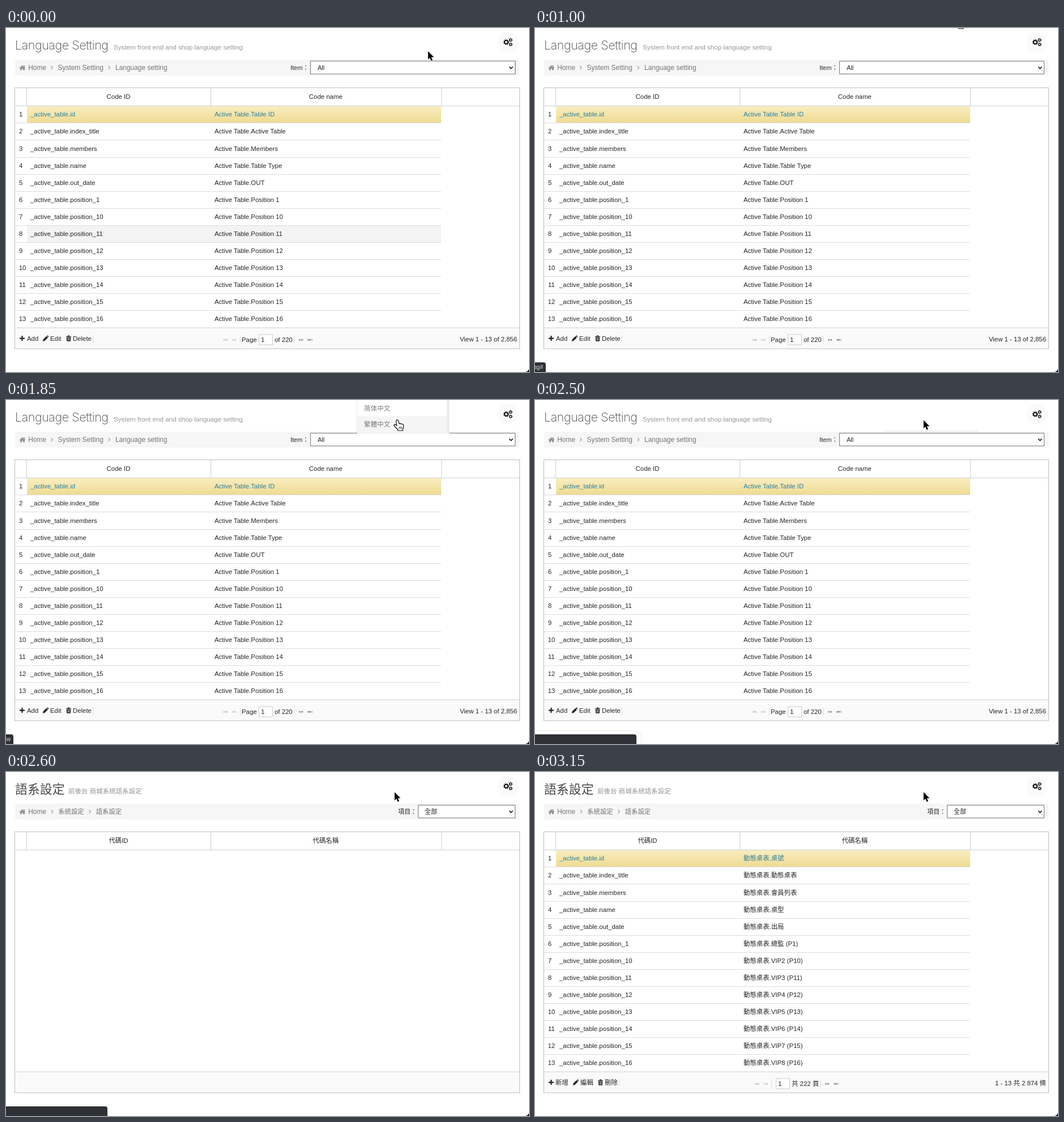
Recreate the animation shown at these times as an HTML page. Size 923 by 607 pixels, loop 3250 ms.

```html
<!DOCTYPE html>
<html lang="en">
<head>
<meta charset="utf-8">
<title>Language Setting</title>
<style>
html, body { margin: 0; width: 100%; height: 100%; overflow: hidden; background: #fff; }
svg { display: block; width: 100vw; height: 100vh; }
text { font-family: "Liberation Sans", "Noto Sans CJK TC", "Noto Sans CJK", sans-serif; font-size: 11.4px; fill: #252525; white-space: pre; }
.title { font-family: Inter, "Noto Sans CJK TC Light", "Noto Sans CJK TC", sans-serif; font-weight: 200; fill: #484848; }
.sub { fill: #969696; }
.crumb { fill: #757575; }
.link { fill: #2d7f9f; }
.menu { font-family: "Noto Sans CJK SC", "Noto Sans CJK TC", sans-serif; font-size: 11.5px; fill: #7a7a7a; }
</style>
</head>
<body>
<svg id="stage" viewBox="0 0 923 607" preserveAspectRatio="none"></svg>
<script>
const LOOP = 3250, STEP = 50;
const stage = document.getElementById('stage');

const text = (x, y, s, attrs = '') => `<text x="${x}" y="${y}" ${attrs}>${s}</text>`;
const rect = (x, y, w, h, fill, attrs = '') =>
  `<rect x="${x}" y="${y}" width="${w}" height="${h}" fill="${fill}" ${attrs}/>`;
const path = (d, attrs) => `<path d="${d}" ${attrs}/>`;
const line = (d, color, w = 1) => path(d, `fill="none" stroke="${color}" stroke-width="${w}"`);
const group = (id, body) => `<g id="${id}">${body}</g>`;
const shift = (x, y, body) => `<g transform="translate(${x} ${y})">${body}</g>`;

const MID = 'text-anchor="middle"', END = 'text-anchor="end"';
const ROW_H = 30.07, ROW_TOP = 137.8;

const suffixes = ['id', 'index_title', 'members', 'name', 'out_date', 'position_1'];
for (let n = 10; n <= 16; n++) suffixes.push('position_' + n);

const langs = {
  en: {
    title: 'Language Setting', titleStyle: 'font-size:21.5px;letter-spacing:-.45px',
    sub: 'System front end and shop language setting', subX: 190, subSize: 11.65,
    crumbs: ['System Setting', 'Language setting'], crumbX: [91.5, 193], crumbSize: 11.95,
    item: 'Item：', itemX: 502, all: 'All', allX: 550, selX: 537.5,
    heads: ['Code ID', 'Code name'],
    prefix: 'Active Table.',
    names: ['Table ID', 'Active Table', 'Members', 'Table Type', 'OUT', 'Position 1'],
    numbered: n => 'Position ' + n,
    tools: ['Add', 'Edit', 'Delete'], toolX: [37, 78, 118], toolEnd: 153.5,
    page: 'Page', pagerX: 383, sepX: 413.5, inputX: 446, of: 'of 220', ofX: 474, nextX: 516, total: 'View 1 - 13 of 2,856'
  },
  zh: {
    title: '語系設定', titleStyle: 'font-size:21.9px',
    sub: '前後台 商城系統語系設定', subX: 110, subSize: 11.5,
    crumbs: ['系統設定', '語系設定'], crumbX: [92.2, 158.7], crumbSize: 11.4,
    item: '項目：', itemX: 692, all: '全部', allX: 739, selX: 727.5,
    heads: ['代碼ID', '代碼名稱'],
    prefix: '動態桌表.',
    names: ['桌號', '動態桌表', '會員列表', '桌型', '出局', '總監 (P1)'],
    numbered: n => `VIP${n - 8} (P${n})`,
    tools: ['新增', '編輯', '刪除'], toolX: [36, 80, 123], toolEnd: 148.5,
    page: '', pagerX: 387.5, sepX: 418, inputX: 425, of: '共 222 頁', ofX: 453, nextX: 511, total: '1 - 13 共 2 874 條'
  }
};

function gear(x, y, r, teeth) {
  const dash = Math.PI * 2 * r / teeth / 2;
  return `<g fill="none" stroke="#222"><circle cx="${x}" cy="${y}" r="${r * .72}" stroke-width="${r * .52}"/>` +
    `<circle cx="${x}" cy="${y}" r="${r}" stroke-width="${r * .4}" stroke-dasharray="${dash}"/></g>`;
}

function header(l) {
  const chevron = x => line(`M${x} 67l2.9 3.1-2.9 3.1`, '#999', 1.1);
  return text(16, 38.4, l.title, `class="title" style="${l.titleStyle}"`) +
    text(l.subX, 38.2, l.sub, `class="sub" style="font-size:${l.subSize}px"`) +
    rect(16, 56, 890, 28, '#f6f6f6') +
    path('M23.5 70.2L29 65.4l2.6 2.3v-1.9h1.4v3.1l1.5 1.3-.8.8-4.7-4.1-4.7 4.1zM25 71l4-3.5 4 3.5v3.6h-2.8v-2.8h-2.4v2.8H25z', 'fill="#8b8b8b"') +
    text(39.2, 74.2, 'Home', 'class="crumb" style="font-size:11.95px"') +
    l.crumbs.map((c, i) => chevron(l.crumbX[i] - 12.2) +
      text(l.crumbX[i], 74.2, c, `class="crumb" style="font-size:${l.crumbSize}px"`)).join('') +
    text(l.itemX, 74, l.item, 'style="font-size:11px"') +
    rect(l.selX, 58.5, 898.5 - l.selX, 22.5, '#fff', 'stroke="#777"') +
    text(l.allX, 74, l.all, 'style="font-size:11px"') +
    line('M888.2 68.4l3.1 3.1 3.1-3.1', '#1c1c1c', 1.7);
}

function grid(l) {
  return rect(16, 529, 890, 37, '#fafafa') +
    rect(15.5, 105.5, 891, 460.5, 'none', 'stroke="#bdbdbd"') +
    line('M16 137.5H906M16 529H906', '#cfcfcf') +
    line('M36.5 106V137M361.5 106V137M768.5 106V137', '#cfcfcf') +
    text(198.5, 125.3, l.heads[0], MID) + text(564.3, 125.3, l.heads[1], MID);
}

function rows(l) {
  return suffixes.map((s, i) => {
    const bottom = ROW_TOP + (i + 1) * ROW_H, base = 156.4 + i * ROW_H, cls = i ? '' : 'class="link"';
    const name = l.names[i] || l.numbered(i + 4);
    return (i ? '' : rect(37, 138, 731, 29, 'url(#gold)')) +
      (i < 12 ? line(`M16 ${Math.floor(bottom) + .5}H768`, '#dcdcdc') : '') +
      text(i < 9 ? 26.2 : 29, base, i + 1, MID) +
      text(43, base, '_active_table.' + s, cls) +
      text(368, base, l.prefix + name, cls);
  }).join('');
}

function arrows(x, color, back) {
  const flip = back ? '' : `transform="matrix(-1 0 0 1 ${2 * x + 24.5} 0)"`;
  const tri = dx => `M${x + dx} 550.3l3.6-2v4z`;
  return `<g ${flip}>` + path(tri(1.4) + tri(4.4) + tri(15.5) + tri(19.5) + `M${x} 548.3h.9v4h-.9z`, `fill="${color}"`) + '</g>';
}

function footer(l) {
  const pencil = '<path d="M0 10l.6-3.2L6.3 1l2.6 2.6-5.7 5.7zM7 .4Q8-.5 9-.1L10 1q.5 1-.5 2z" fill="#222"/>';
  const bin = '<path d="M0 1.6h2.6L3.3 0h2.6l.7 1.6H9v1.2H0zM.8 3.4h7.5L8 10.2H1.2z" fill="#222"/>' +
    line('M3 4.5v4.4M4.6 4.5v4.4M6.2 4.5v4.4', '#fafafa', .7);
  const [, edit, remove] = l.toolX;
  return line('M24 547.6h9M28.5 543.1v9', '#222', 2.2) +
    shift(edit - 13, 542.8, pencil) + shift(remove - 12, 542.5, bin) +
    l.toolX.map((x, i) => text(x, 552, l.tools[i])).join('') +
    line(`M${l.toolEnd} 542v14M${l.sepX} 543v14M${l.nextX - 7} 543v14`, '#dcdcdc') +
    arrows(l.pagerX, '#c8c8c8', true) + arrows(l.nextX, '#8a8a8a', false) +
    text(416, 553.8, l.page) +
    rect(l.inputX + .5, 541, 24, 18, '#fff', 'stroke="#cbcbcb"') +
    text(l.inputX + 4, 553.8, '1') + text(l.ofX, 553.8, l.of) +
    text(902, 553.3, l.total, END);
}

const { en, zh } = langs;
stage.innerHTML =
  '<defs><linearGradient id="gold" x2="0" y2="1"><stop stop-color="#f9edc1"/><stop offset="1" stop-color="#eedb92"/></linearGradient></defs>' +
  rect(0, 0, 923, 607, '#fff') +
  group('en', header(en) + grid(en) + rect(37, 348.5, 731, 30, '#f3f3f3', 'id="hover"') + rows(en) + footer(en) +
    rect(536.9, 57.9, 362.4, 23.8, 'none', 'id="focus" stroke="#b9bcc0" stroke-width=".8"')) +
  group('zhHead', header(zh)) +
  group('zhGrid', grid(zh)) +
  group('zhRows', rows(zh) + footer(zh)) +
  '<circle cx="885.8" cy="25" r="18" fill="#fafafa"/>' +
  gear(882.8, 25, 4.2, 8) + gear(890.6, 21.2, 2.7, 6) + gear(890.6, 29, 2.7, 6) +
  group('menu',
    rect(620, 0, 162.5, 59, '#ededed') + rect(620, 0, 158, 57.5, '#fff') +
    rect(620, 0, 158, 28.5, '#f5f5f5', 'id="item1"') + rect(620, 28.5, 158, 28.5, '#f5f5f5', 'id="item2"') +
    line('M619.5 0V58', '#e8e8e8') +
    text(632, 19, '简体中文', 'class="menu"') + text(632, 46.7, '繁體中文', 'class="menu"')) +
  group('edge', line('M618 55H782', '#dedede')) +
  group('halo', line('M0 583.5H176Q187.5 584 187.5 597V607', '#ebebeb')) +
  group('unpainted', rect(0, 485, 923, 122, '#3d3d3d') + line('M922.5 485V607', '#565656') + line('M180 604.5H915', '#4a4146')) +
  group('status', path('', 'id="bubble"') + text(0, 601.5, '', `id="url" ${END} style="fill:#d5d7da;font-size:10.5px"`)) +
  path('M923 602Q921.5 606 917 607H923z', 'fill="#000"') +
  group('arrow', path('M0 0V14.6L3.3 11.5 5.6 17 8.1 16 5.8 10.6H10.4z', 'fill="#000" stroke="#fff" stroke-width="1.6" paint-order="stroke"')) +
  group('hand', path('M-1.6 1.2Q-1.2-.9.7-.8 2.4-.6 2.8 1.5L3.7 6Q5 4.6 6.3 6.2 8 5 9 6.8 11.2 6.2 11.6 8.8V12Q11.3 14 10.3 15.6V18H1.5V16Q-1.5 13.5-4.9 9.5-6 7.6-4 7.2-2.4 7.2-.2 9.4z', 'fill="#fff" stroke="#111" stroke-width="1.2" stroke-linejoin="round"') +
    line('M4 11v4.2M6.3 11v4.2M8.6 11v4.2', '#111', .9));

const el = id => document.getElementById(id);
const show = (id, on) => { el(id).style.display = on ? '' : 'none'; };
const clamp = v => Math.max(0, Math.min(1, v));
const ease = v => v * v * (3 - 2 * v);
const ramp = (t, a, b) => clamp((t - a) / (b - a));

// Pointer stops: time, x, y
const stops = [[0, 744.8, 41], [50, 744.8, 41], [450, 747, -20], [650, 749, -30], [1000, 746, -17],
  [1300, 746, -17], [1750, 690, 36], [1900, 690, 36], [2050, 685.8, 35.6], [LOOP, 685.8, 35.6]];

function pointer(t) {
  const i = stops.findIndex(s => t < s[0]);
  const [a, b] = [stops[i - 1], stops[i]];
  const k = ease(ramp(t, a[0], b[0]));
  return [a[1] + (b[1] - a[1]) * k, a[2] + (b[2] - a[2]) * k];
}

function status(t, item, blank) {
  const grow = ease(ramp(t, 2000, 2250));
  const short = item || t >= 1700;
  const w = (short ? 13 : 19) + grow * 166;
  el('bubble').setAttribute('d', `M0 590H${w - 4}Q${w} 590 ${w} 594V607H0z`);
  el('bubble').setAttribute('fill', blank ? '#3a404a' : '#2d3136');
  el('bubble').setAttribute('stroke', blank ? '#24272b' : 'none');
  el('url').textContent = grow ? '' : item === 1 ? 'n' : short ? 'w' : 'ng#';
  el('url').setAttribute('x', short ? 8 : 14.3);
  el('status').style.opacity = ramp(t, 350, 550) * (1 - ramp(t, 2850, 3100));
}

function draw(t) {
  const [x, y] = pointer(t);
  const menu = t >= 1150 && t < 2000;
  const item = !menu || y < 0 ? 0 : y < 28.5 ? 1 : 2;
  const blank = t >= 2550 && t < 2600;
  const hand = t >= 400 && t < 2000;

  show('en', t < 2550);
  show('hover', t < 50);
  show('focus', t < 650);
  show('zhHead', t >= 2550);
  show('zhGrid', t >= 2600);
  show('zhRows', t >= 2850);
  show('unpainted', blank);
  show('menu', menu);
  show('item1', item === 1);
  show('item2', item === 2);
  show('edge', t >= 2000 && t < 2550);
  show('halo', t >= 2250 && t < 2550);
  show('hand', hand);
  show('arrow', !hand);
  el(hand ? 'hand' : 'arrow').setAttribute('transform', `translate(${x} ${y})`);
  status(t, item, blank);
}

const start = performance.now();
function tick(now) {
  const t = Math.max(0, now - start) % LOOP;
  draw(Math.floor(t / STEP) * STEP);
  requestAnimationFrame(tick);
}
draw(0);
requestAnimationFrame(tick);
</script>
</body>
</html>
```
